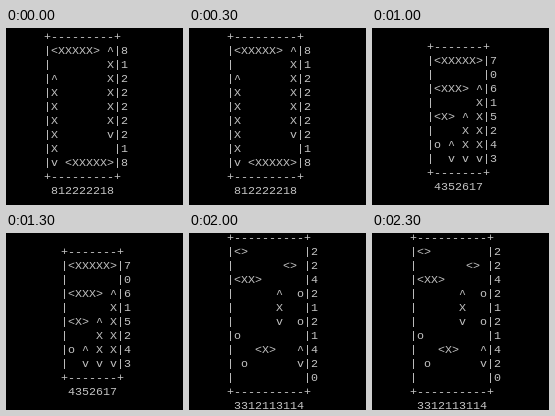
These frames come from a looping animation (177 by 177 pixels, 2.5 s). An HTML page:

```html
<!DOCTYPE html>
<html lang="en">
<head>
<meta charset="utf-8">
<title>Battleship grids</title>
<style>
  html, body { margin: 0; width: 100%; height: 100%; overflow: hidden; background: #000; }
  #stage { position: relative; width: 100%; height: 100%; overflow: hidden; contain: strict; }
  pre {
    position: absolute;
    margin: 0;
    color: #c4c4c4;
    font: 11.665px/14px "Liberation Mono", monospace;
    font-variant-ligatures: none;
  }
</style>
</head>
<body>
<div id="stage"></div>
<script>
const STEP = 500;

// Ships only; the border and the tallies are derived.
const boards = [
  { x: 38, y: 2, width: 9, rows: [
    "<XXXXX> ^",
    "        X",
    "^       X",
    "X       X",
    "X       X",
    "X       X",
    "X       v",
    "X",
    "v <XXXXX>"] },
  { x: 31, y: 20, width: 13, rows: [
    "^ ^ ^ ^ ^ ^ o",
    "X X X X X v",
    "X X X X v",
    "X X X v",
    "X X v",
    "X v",
    "v"] },
  { x: 55, y: 12, width: 7, rows: [
    "<XXXXX>",
    "",
    "<XXX> ^",
    "      X",
    "<X> ^ X",
    "    X X",
    "o ^ X X",
    "  v v v"] },
  { x: 55, y: 12, width: 7, rows: [
    "<XXXXX>",
    "",
    "^ <X> ^",
    "X     X",
    "X   ^ X",
    "v o v X",
    "      X",
    "<XXX> v"] },
  { x: 38, y: -2, width: 10, rows: [
    "<>",
    "       <>",
    "<XX>",
    "      ^  o",
    "      X",
    "      v  o",
    "o",
    "   <X>   ^",
    " o       v",
    ""] }
];

const count = cells => [...cells].filter(c => c !== " ").length;

function layout({ width, rows }) {
  const grid = rows.map(row => row.padEnd(width));
  const edge = "+" + "-".repeat(width) + "+";
  const columns = Array.from({ length: width }, (_, i) => count(grid.map(row => row[i])));
  return [edge, ...grid.map(row => `|${row}|${count(row)}`), edge, " " + columns.join("")].join("\n");
}

const stage = document.getElementById("stage");
const views = boards.map(board => {
  const pre = document.createElement("pre");
  pre.textContent = layout(board);
  pre.style.left = board.x + "px";
  pre.style.top = board.y + "px";
  stage.append(pre);
  return pre;
});

const start = performance.now();

function draw(now) {
  const current = Math.floor(Math.max(0, now - start) / STEP) % views.length;
  views.forEach((view, i) => view.hidden = i !== current);
  requestAnimationFrame(draw);
}
draw(start);
</script>
</body>
</html>
```
